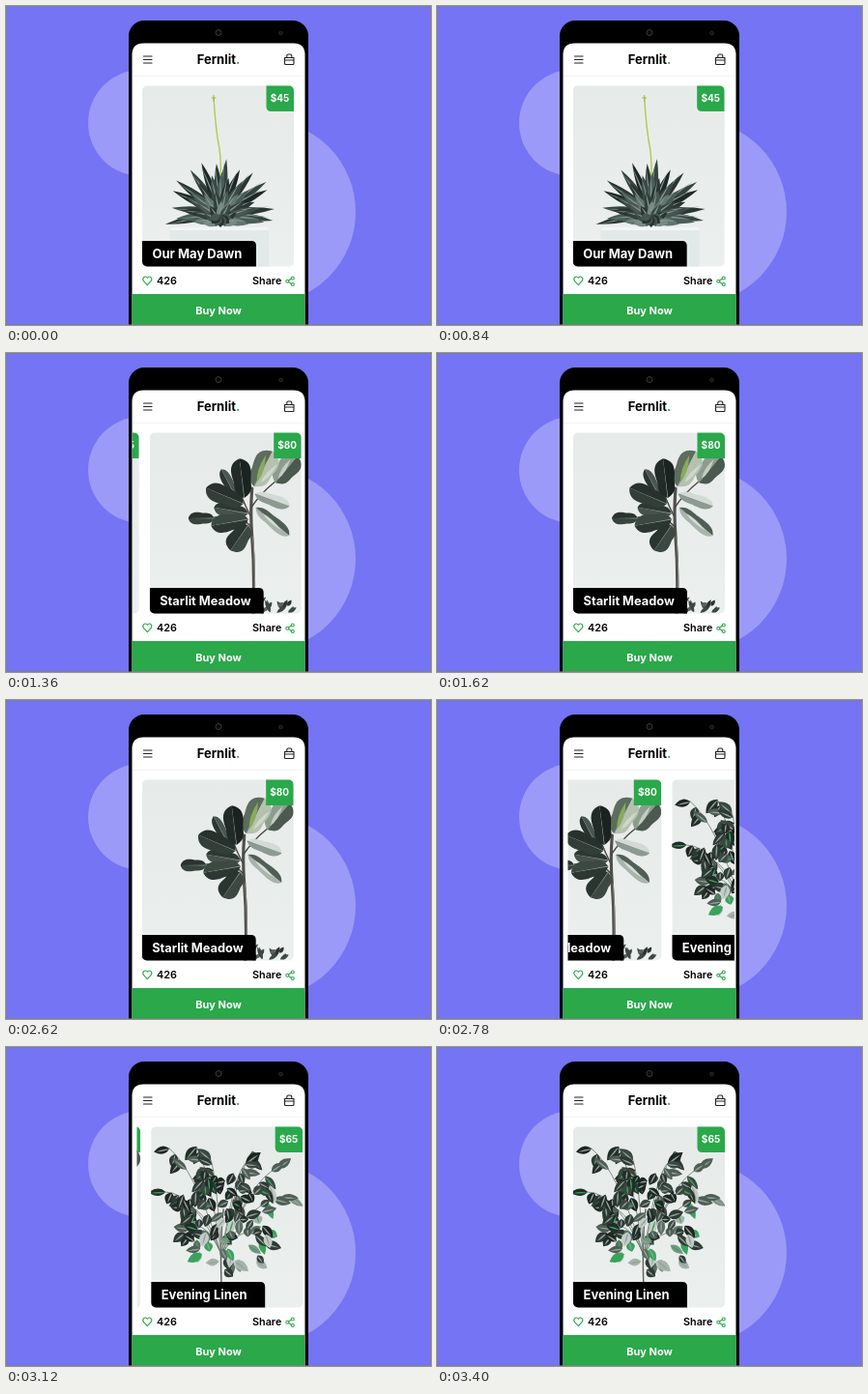
These frames come from a looping animation (440 by 330 pixels, 6000 ms). An HTML page:

```html
<!DOCTYPE html>
<html lang="en">
<head>
<meta charset="utf-8">
<title>Plant shop</title>
<style>
  html, body { margin: 0; width: 100%; height: 100%; overflow: hidden; background: #7474f4; }
  svg { display: block; width: 440px; height: 330px; }
  text { font-family: Inter, "Open Sans", sans-serif; font-weight: 700; }
  .mid { text-anchor: middle; }
  .semi { font-weight: 600; }
  .line { fill: none; stroke-linecap: round; stroke-linejoin: round; }
</style>
</head>
<body>
<svg viewBox="0 0 440 330">
  <defs>
    <clipPath id="view"><rect id="viewRect" x="131" y="82" width="177" height="188"/></clipPath>
    <clipPath id="card"><rect x="141" y="82.5" width="157" height="187" rx="5"/></clipPath>
    <linearGradient id="wall" x2="0" y2="1">
      <stop stop-color="#e6ebea"/><stop offset="1" stop-color="#ebefee"/>
    </linearGradient>
  </defs>

  <rect width="440" height="330" fill="#7474f4"/>
  <circle cx="140" cy="121" r="55" fill="#9c9af9"/>
  <circle cx="267" cy="213" r="95" fill="#9c9af9"/>

  <rect x="127" y="15" width="186" height="340" rx="16"/>
  <circle cx="220" cy="27.5" r="3" fill="#0b0b0b" stroke="#3a3a3a"/>
  <circle cx="284.500" cy="28" r="1.800" fill="#111" stroke="#333" stroke-width=".8"/>
  <path d="M130.500 330V50.500q0-12 12-12H297.500q12 0 12 12V330Z" fill="#fff"/>
  <path d="M131 72.500H309" stroke="#f3f3f3"/>

  <path class="line" d="M142.500 52H151M142.500 55.500H151M142.500 59H151" stroke="#222" stroke-width="1.200"/>
  <text class="mid" x="220" y="60" font-size="13">Fernlit<tspan fill="#2aa84a">.</tspan></text>
  <path class="line" d="M288.500 53.500H298V59.500q0 1-1 1H289.500q-1 0-1-1ZM290.800 53.500V51.500q0-1.500 1.500-1.500h2q1.500 0 1.500 1.500V53.500M288.500 56H298" stroke="#222" stroke-width="1.100"/>

  <g id="cards" clip-path="url(#view)"></g>

  <path class="line" d="M146.300 288.700L142.600 284.700C140.300 282 143.800 277.800 146.300 281.300C148.800 277.800 152.300 282 150 284.700Z" stroke="#2aa84a" stroke-width="1.100"/>
  <text class="semi" x="156" y="288.300" font-size="10.800">426</text>
  <text class="semi" x="255" y="288.300" font-size="10.800">Share</text>
  <g class="line" stroke="#2aa84a" stroke-width="1.100">
    <path d="M292.500 284L295.500 282M292.500 285.500L295.500 287.500"/>
    <circle cx="291.300" cy="284.700" r="1.500"/>
    <circle cx="296.800" cy="281.500" r="1.500"/>
    <circle cx="296.800" cy="288" r="1.500"/>
  </g>

  <rect x="130.500" y="298" width="179" height="32" fill="#2aa84a"/>
  <text class="mid" x="220" y="319" font-size="11" fill="#fff">Buy Now</text>
  <rect x=".5" y=".5" width="439" height="329" fill="none" stroke="#808080" stroke-opacity=".6"/>
</svg>

<script>
const LOOP = 6000, STEP = 20, SLIDE = 800, PITCH = 168;
const STARTS = [820, 2600];

let seed = 7;
const rnd = () => (seed = (seed * 16807) % 2147483647) / 2147483647;
const spread = size => (rnd() - .5) * size;
const pick = list => list[Math.floor(rnd() * list.length)];
const n = v => v.toFixed(1);

const shape = (x, y, angle, d, fill) =>
  `<path transform="translate(${n(x)} ${n(y)}) rotate(${n(angle)})" d="${d}" fill="${fill}"/>`;
const stroke = (d, color, width) =>
  `<path class="line" d="${d}" stroke="${color}" stroke-width="${width}"/>`;

// Pointed leaf, from base to tip
const blade = (x, y, angle, len, w, fill) =>
  shape(x, y, angle, `M0 0Q${n(len * .4)} ${n(-w)} ${n(len)} 0Q${n(len * .4)} ${n(w)} 0 0`, fill);

// Broad wavy leaf with a shaded half and a midrib
function broad(x, y, angle, len, w, fill, shade) {
  const h = w / 2;
  const edge = side => `C${n(len * .12)} ${n(side * h)} ${n(len * .28)} ${n(side * h * .8)} ${n(len * .42)} ${n(side * h * .85)}` +
    `S${n(len * .9)} ${n(side * h * 1.4)} ${n(len)} 0`;
  return shape(x, y, angle, `M0 0${edge(-1)}Z`, fill) +
    shape(x, y, angle, `M0 0${edge(1)}Z`, shade) +
    shape(x, y, angle, `M0 -.4L${n(len * .9)} 0L0 .4Z`, '#7f8c82');
}

function succulent() {
  let out = '<rect x="170" y="229" width="102" height="42" rx="3" fill="#e2e9e9"/>' +
    '<rect x="170" y="229" width="102" height="3" rx="1.500" fill="#f1f5f4"/>' +
    stroke('M215 95Q217 128 221 148Q223 162 222 178', '#b3c94a', 1.4) +
    stroke('M213 95H217M215 92.500V98', '#9fbd3c', 1.2);
  const rings = [
    { count: 14, len: 55, w: 8, fills: ['#2b3633', '#35433f', '#1f2826'] },
    { count: 13, len: 43, w: 9, fills: ['#4a5c57', '#2a3532', '#3b4a46'] },
    { count: 10, len: 31, w: 9, fills: ['#62756f', '#333f3c', '#47564f'] },
    { count: 7, len: 20, w: 9, fills: ['#778983', '#3c4a46', '#2a3431'] }
  ];
  rings.forEach(({ count, len, w, fills }, r) => {
    for (let i = 0; i < count; i++) {
      const angle = -187 + 194 * i / (count - 1) + spread(9);
      const l = len * (.88 + rnd() * .2), y = 214 + r * 3;
      out += blade(222, y, angle, l, w, fills[i % 3]) +
        blade(222, y - 1, angle - 2, l * .92, 1.6, '#82958f');
    }
  });
  for (let i = 0; i < 7; i++) out += blade(222, 217, 15 + i * 25, 12, 8, i % 2 ? '#27312e' : '#465550');
  return out;
}

function fiddleLeaf() {
  let out = stroke('M248 272Q250 230 247 190Q245 165 247 140', '#504f4b', 3.2) +
    stroke('M249 272Q251 230 248 190', '#85837d', 1) +
    stroke('M246 180Q238 168 208 170M245 168Q240 158 236 148M246 160Q256 145 271 133', '#4a453f', 1.4);
  const leaves = [
    [232, 152, -118, 36, 11, '#2c3531', '#4a5650'],
    [243, 166, -170, 36, 15, '#46534c', '#2d3733'],
    [208, 171, 180, 27, 13, '#38433e', '#2a332f'],
    [238, 156, -157, 42, 20, '#333e39', '#28312d'],
    [243, 172, 170, 39, 19, '#2c3632', '#3c4842'],
    [243, 178, 125, 32, 22, '#3c4943', '#2a3430'],
    [271, 134, -50, 36, 23, '#8e9c90', '#4c594f'],
    [251, 160, 40, 45, 13, '#515e55', '#a9b4ab'],
    [250, 146, 19, 38, 13, '#d3d9d5', '#8d9a91'],
    [249, 138, -62, 41, 26, '#5d6c5d', '#b4c1ae'],
    [239, 150, -97, 41, 21, '#222b28', '#1b2320']
  ];
  for (const leaf of leaves) out += broad(...leaf);
  out += blade(252, 134, -72, 30, 5, '#86ac5c') + blade(256, 134, -48, 26, 4, '#cfd8cb') +
    blade(274, 130, -58, 24, 4, '#c3cdc2') + blade(258, 166, 42, 26, 3, '#d5dbd6');
  for (let i = 0; i < 18; i++)
    out += blade(250 + rnd() * 38, 270 - rnd() * 9, -90 + spread(130), 5 + rnd() * 9, 4, pick(['#2b3330', '#59635d', '#3e4843']));
  for (let i = 0; i < 5; i++)
    out += blade(146 + i * 4, 270, -90 + spread(80), 9, 4, '#c9d0cd');
  return out;
}

function bush() {
  const dark = ['#222c28', '#2d3934', '#3a4841', '#1d2522', '#4e5e54'];
  const light = ['#c3ccc6', '#a5b3aa', '#5b6d62', '#2f3c36', '#2f3c36', '#38a35a', '#7d9385'];
  const leaf = (x, y, angle, len) => {
    const fill = pick(x * .6 + y > 325 + spread(70) ? light : dark);
    return blade(x, y, angle, len, 7 + rnd() * 3, fill) +
      blade(x, y + .5, angle, len * .85, 1.6, rnd() < .15 ? '#38a35a' : '#93a298');
  };
  const tips = [
    [160, 105], [156, 150], [188, 103], [203, 117], [246, 108], [238, 121], [272, 125],
    [283, 155], [264, 143], [259, 203], [174, 166], [176, 192]
  ];
  let stems = stroke('M214 250Q212 200 216 168', '#59635a', 1.4), leaves = '';
  for (const [x, y] of tips) {
    const cx = (x + 214) / 2, cy = y * .5 + 75;
    stems += stroke(`M214 215Q${n(cx)} ${n(cy)} ${x} ${y}`, '#6b766d', .8);
    const out = x < 214 ? 165 : 15;
    for (let i = 0; i < 4; i++) {
      const k = 1 - i * .11, m = 1 - k;
      leaves += leaf(m * m * 214 + 2 * m * k * cx + k * k * x, m * m * 215 + 2 * m * k * cy + k * k * y,
        out + spread(130), 12 + rnd() * 8);
    }
  }
  // Core of drooping leaves that narrows towards the stem
  for (let i = 0; i < 105; i++) {
    const a = rnd() * Math.PI * 2, r = Math.sqrt(rnd());
    const y = 178 + Math.sin(a) * r * 54;
    const x = 217 + (y - 178) * .18 + Math.cos(a) * r * 44;
    leaves += leaf(x, y, 90 - (x - 217) * 1.3 + spread(170), 9 + rnd() * 9);
  }
  return stems + leaves;
}

const products = [
  { name: 'Our May Dawn', price: '$45', size: 13, round: 5, plant: succulent },
  { name: 'Starlit Meadow', price: '$80', size: 12.8, round: 0, plant: fiddleLeaf },
  { name: 'Evening Linen', price: '$65', size: 13, round: 5, plant: bush }
];

const cardsBox = document.getElementById('cards');
cardsBox.innerHTML = products.map(({ name, price, size, round, plant }) => `<g><g clip-path="url(#card)">
  <rect x="141" y="82" width="158" height="188" fill="url(#wall)"/>
  ${plant()}
  <path d="M298 82V109H${269.5 + round}q${-round} 0 ${-round} ${-round}V82Z" fill="#2aa84a"/>
  <path d="M141 270V243H254q5 0 5 5V270Z"/></g>
  <text class="mid" x="283.500" y="99.300" font-size="10" fill="#fff">${price}</text>
  <text x="151.500" y="261" font-size="${size}" fill="#fff">${name}</text></g>`).join('');

const cards = [...cardsBox.children];
const viewRect = document.getElementById('viewRect');

// Cubic Bezier (.35, 0) (0, 1), solved by bisection
function ease(x) {
  if (x <= 0) return 0;
  if (x >= 1) return 1;
  let lo = 0, hi = 1;
  for (let i = 0; i < 30; i++) {
    const s = (lo + hi) / 2;
    if (1.05 * s * (1 - s) ** 2 + s ** 3 < x) lo = s; else hi = s;
  }
  return 3 * lo ** 2 - 2 * lo ** 3;
}

function draw(now) {
  const t = Math.floor((now % LOOP) / STEP) * STEP;
  const shift = PITCH * STARTS.reduce((sum, start) => sum + ease((t - start) / SLIDE), 0);
  cards.forEach((card, i) => card.setAttribute('transform', `translate(${(i * PITCH - shift).toFixed(2)} 0)`));
  const left = t > STARTS[1] ? 135.5 : 131;
  viewRect.setAttribute('x', left);
  viewRect.setAttribute('width', 308 - left);
}

let origin;
function tick(now) {
  origin ??= now;
  draw(now - origin);
  requestAnimationFrame(tick);
}
draw(0);
requestAnimationFrame(tick);
</script>
</body>
</html>
```
